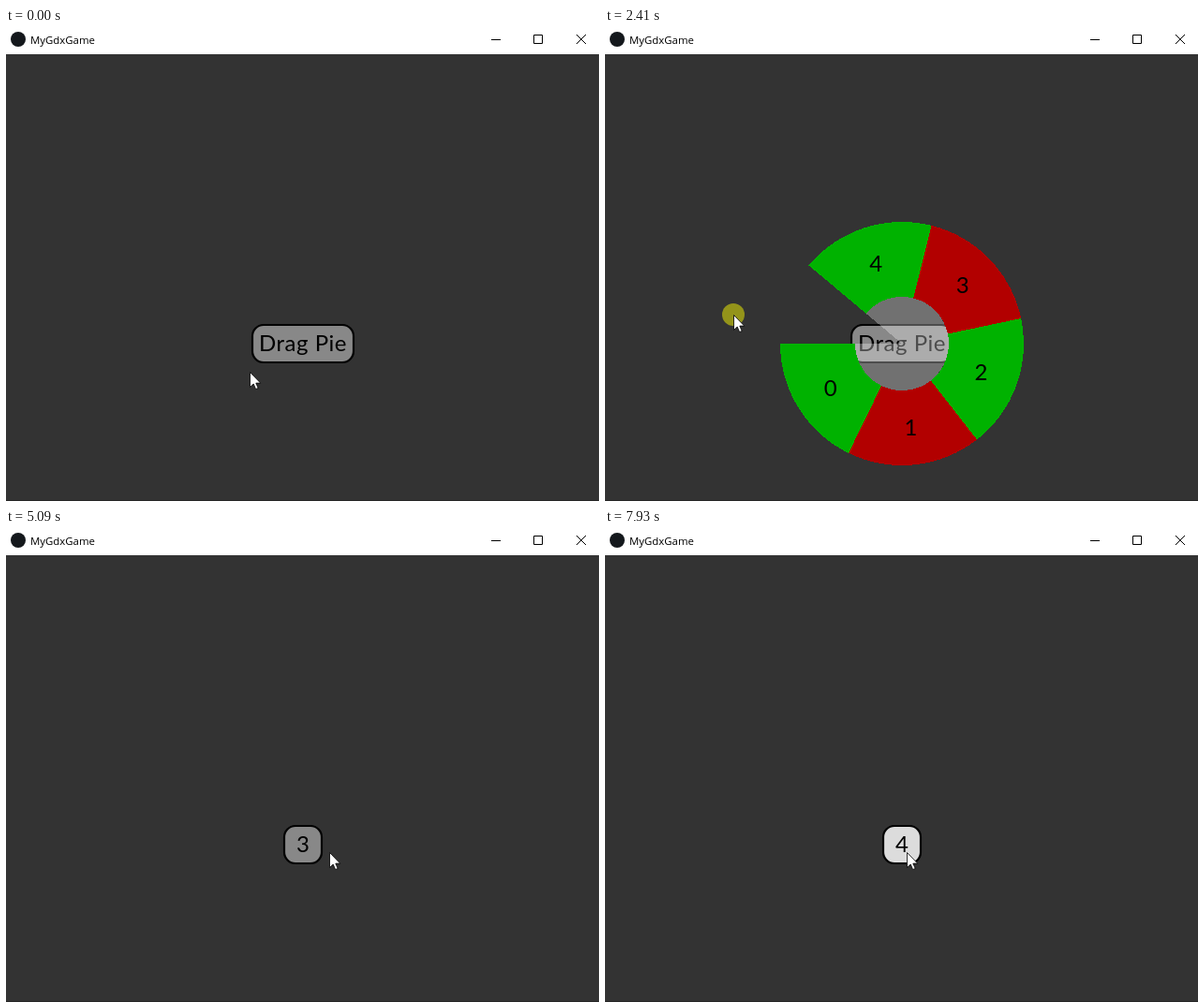
Recreate the animation shown at these times as an HTML page. Size 633 by 505 pixels, loop 8000 ms.

```html
<!DOCTYPE html>
<html lang="en">
<head>
<meta charset="utf-8">
<title>Pie menu</title>
<style>
  html, body { margin: 0; width: 100%; height: 100%; overflow: hidden; background: #333; }
  svg { display: block; width: 633px; height: 505px; }
  .label { font: 24px Lato, sans-serif; text-anchor: middle; fill: #000; }
  .title { font: 11.4px "Open Sans", "Noto Sans", sans-serif; fill: #000; }
</style>
</head>
<body>
<svg viewBox="0 0 633 505">
  <rect width="633" height="505" fill="#333"/>
  <rect y="504" width="633" height="1" fill="#262626"/>
  <rect width="633" height="28" fill="#fff"/>
  <circle cx="13" cy="12" r="8" fill="#14181c"/>
  <text class="title" x="26" y="17">MyGdxGame</text>
  <path d="M518 12.5h10M563.5 7.5h9v9h-9zM609 7l10 10M619 7l-10 10" fill="none" stroke="#000"/>
  <rect id="button" y="317" height="40" rx="12" stroke="#000" stroke-width="2.2"/>
  <text id="caption" class="label" x="317" y="345"></text>
  <g id="pie"></g>
  <circle id="press" r="12" fill="#ff0" fill-opacity=".48"/>
  <path id="cursor" d="M.5 .5V16.5L4.2 13L6.6 18.5L9.2 17.5L6.8 12.1H11.7Z" fill="#fff" stroke="#000" stroke-width=".8"/>
</svg>
<script>
const LOOP = 8000, STEP = 76.98;
const CX = 317, CY = 337, OUTER = 130, INNER = 50, SPAN = 64, COUNT = 5;
const GREEN = '#00b200', RED = '#b20000', PINK = '#b24c7f';

// Pointer stops are [step, angle, radius] around the pie centre
const drags = [
  {
    press: 4, release: 54, slice: 2,
    tour: [
      [11, 311.5, 34.7], [15, 186, 85], [19, 60, 82], [28, 25, 200],
      [31, 350.2, 182.7], [37, 208, 230], [43, 100, 106], [47, 154, 148]
    ]
  },
  { press: 60, release: 64, slice: 3, rest: [66, 164, 29.1] },
  { press: 69, release: 73, slice: 4, rest: [76, 76, 41.2] },
  { press: 80, release: 94, slice: 4, tour: [[86, 328, 49.4], [90, 328, 49.4]] },
  { press: 98, release: 100, slice: 4, rest: [103, 122, 9.4] }
];

// Settle on the button, press, wander, let go over a slice, rest
function stopsOf({ press, release, slice, tour = [], rest }) {
  const reach = 3 * Math.min(4, release - press) ** 2;
  return [
    [press - 2, 90, 6], [press, 90, 6], ...tour,
    [release, (slice + .5) * SPAN, reach], ...(rest ? [rest] : [])
  ];
}
const stops = [[0, 27.8, 64.4], ...drags.flatMap(stopsOf)];

const $ = id => document.getElementById(id);

function add(parent, tag, attrs) {
  const el = document.createElementNS('http://www.w3.org/2000/svg', tag);
  set(el, attrs);
  return parent.appendChild(el);
}

function set(el, attrs) {
  for (const key in attrs) el.setAttribute(key, attrs[key]);
}

// Angles run counterclockwise from the left
function polar(radius, degrees) {
  const a = degrees * Math.PI / 180;
  return [CX - radius * Math.cos(a), CY + radius * Math.sin(a)];
}

function sector(inner, outer, from, to) {
  const large = to - from > 180 ? 1 : 0;
  return `M${polar(inner, from)}L${polar(outer, from)}` +
    `A${outer} ${outer} 0 ${large} 0 ${polar(outer, to)}L${polar(inner, to)}` +
    (inner ? `A${inner} ${inner} 0 ${large} 1 ${polar(inner, from)}` : '') + 'Z';
}

const pie = $('pie');
set(pie, { 'shape-rendering': 'crispEdges' });
add(pie, 'path', { d: sector(0, INNER, 0, SPAN * COUNT), fill: '#fff', 'fill-opacity': .3 });
const slices = Array.from({ length: COUNT }, (_, i) => {
  const slice = add(pie, 'path', { d: sector(INNER, OUTER, i * SPAN, (i + 1) * SPAN) });
  const [x, y] = polar((INNER + OUTER) / 2, (i + .5) * SPAN);
  add(pie, 'text', { class: 'label', x, y: y + 8.5 }).textContent = i;
  return slice;
});

// Swings the shorter way round between neighbouring stops
function pointerAt(step) {
  const next = Math.max(1, stops.findIndex(stop => stop[0] >= step));
  const [n0, a0, r0] = stops[next - 1], [n1, a1, r1] = stops[next];
  const k = (step - n0) / (n1 - n0);
  const turn = (a1 - a0 + 540) % 360 - 180;
  return polar(r0 + (r1 - r0) * k, a0 + turn * k).map(Math.round);
}

function sliceUnder(x, y) {
  const degrees = Math.atan2(y - CY, CX - x) * 180 / Math.PI;
  return Math.floor((degrees + 360) % 360 / SPAN);
}

function render(time) {
  const step = Math.floor(time / STEP);
  const [x, y] = pointerAt(step);
  const pressed = drags.some(d => step >= d.press && step < d.release);
  const done = drags.filter(d => step >= d.release).pop();
  const half = done ? 20 : 54;
  const hover = !pressed && Math.abs(x - CX) <= half + 1 && Math.abs(y - CY) <= 21;

  set($('button'), { x: CX - half, width: half * 2, fill: hover ? '#dcdcdc' : '#888' });
  $('caption').textContent = done ? done.slice : 'Drag Pie';
  $('caption').style.letterSpacing = done ? '0' : '.5px';

  const active = sliceUnder(x, y);
  slices.forEach((slice, i) => set(slice, { fill: i === active ? PINK : i % 2 ? RED : GREEN }));
  const display = pressed ? 'inline' : 'none';
  set(pie, { display });
  set($('press'), { display, cx: x, cy: y });
  set($('cursor'), { transform: `translate(${x} ${y})` });
}

const start = performance.now();
function frame() {
  render((performance.now() - start) % LOOP);
  requestAnimationFrame(frame);
}
frame();
</script>
</body>
</html>
```
